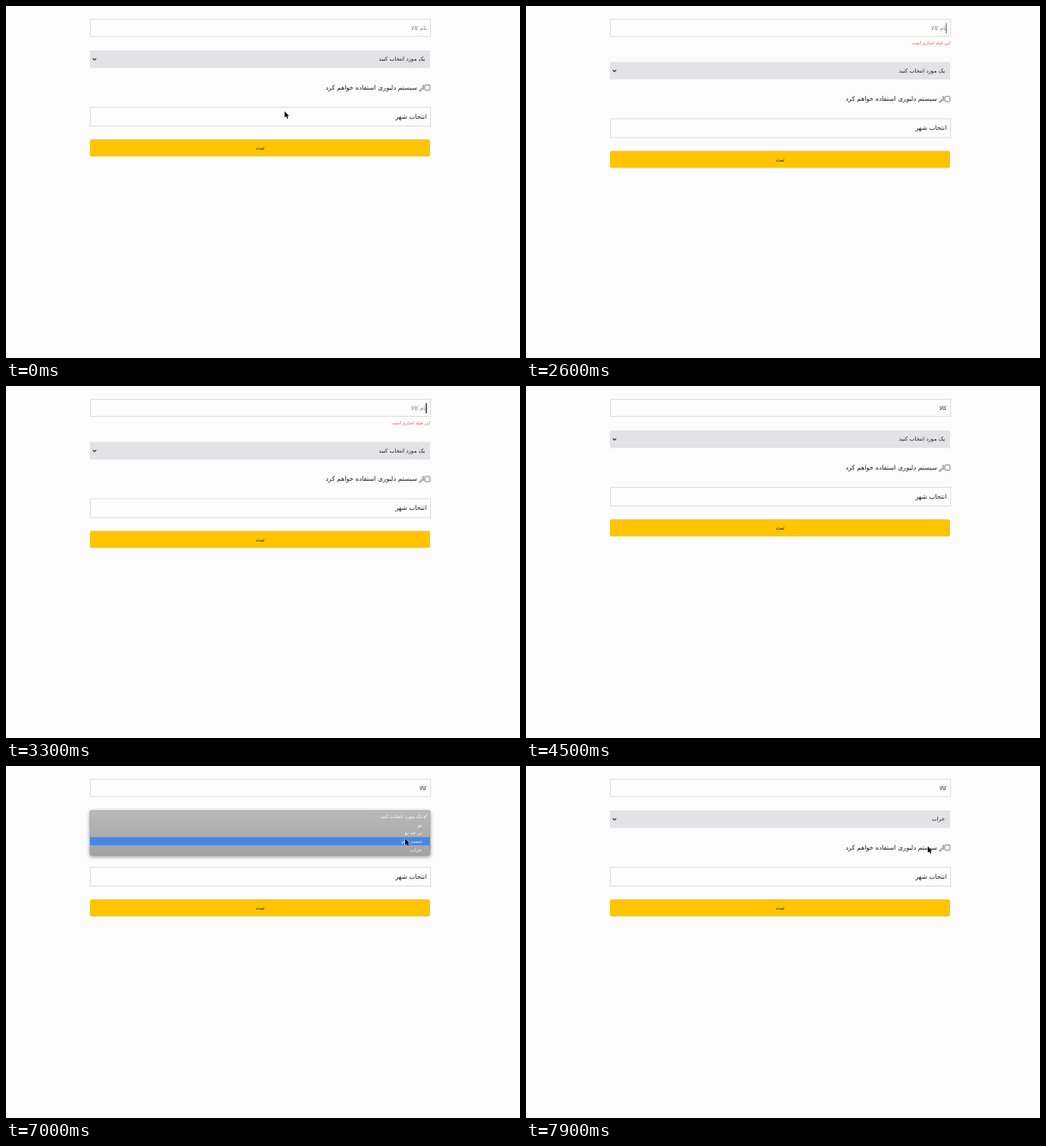
An HTML page for the animation above (8000 ms loop, 600 by 412 pixels).

```html
<!DOCTYPE html>
<html lang="fa">
<head>
<meta charset="utf-8">
<title>Form</title>
<style>
  html, body { margin: 0; width: 100%; height: 100%; overflow: hidden; background: #fcfcfc; }
  svg { display: block; width: 100vw; height: 100vh; }
  text { font-family: "DejaVu Sans", "Noto Sans", sans-serif; direction: rtl; text-rendering: geometricPrecision; fill: #1c1c1c; }
  .small { font-size: 6.35px; }
  .body { font-size: 7.45px; }
  .error { font-size: 5.1px; fill: #f2545b; }
  .field { fill: #fdfdfd; stroke: #dedede; }
  .menu text { font-size: 5.7px; fill: #fff; }
</style>
</head>
<body>
<svg viewBox="0 0 600 412" preserveAspectRatio="none">
  <defs>
    <linearGradient id="gray" x1="0" y1="0" x2="0" y2="1">
      <stop offset="0" stop-color="#b9b9ba"/>
      <stop offset="1" stop-color="#a2a2a3"/>
    </linearGradient>
    <filter id="shadow" x="-5%" y="-30%" width="110%" height="170%">
      <feDropShadow dx="0" dy="1.6" stdDeviation="1.9" flood-color="#000" flood-opacity=".42"/>
    </filter>
  </defs>
  <rect width="600" height="412" fill="#fcfcfc"/>

  <rect class="field" x="98.5" y="15.5" width="397" height="20"/>
  <text id="value" class="small" x="491" y="28"></text>
  <rect id="caret" y="20" width="1" height="12" fill="#111"/>
  <text id="error" class="error" x="495" y="45.2">این فیلد اجباری است</text>

  <g id="rest">
    <rect x="98" y="52" width="397" height="20.5" fill="#e3e3e7"/>
    <path d="M101.3 61.3l2 2 2-2" fill="none" stroke="#222" stroke-width="1.1"/>
    <text id="choice" class="small" x="489" y="64.2"></text>
    <rect x="488.9" y="92.4" width="6" height="6" rx=".8" fill="#fff" stroke="#666" stroke-width=".8"/>
    <text class="body" x="488" y="97.6">از سیستم دلیوری استفاده خواهم کرد</text>
    <rect class="field" x="98.5" y="118.5" width="397" height="22"/>
    <text class="body" x="491" y="131.8">انتخاب شهر</text>
    <rect x="98" y="156" width="397" height="20" rx="2" fill="#ffc400"/>
    <text class="small" x="296.8" y="168" text-anchor="middle" style="fill:#2b2400">ثبت</text>
  </g>

  <g id="menu" class="menu">
    <rect x="98" y="52" width="397" height="52.6" rx="1.6" fill="url(#gray)" stroke="#8d8d8d" stroke-width=".5" filter="url(#shadow)"/>
    <rect id="highlight" x="98" width="397" height="9.5" fill="#4688e6"/>
    <path d="M487.6 59.2l1.2 1.7 2.3-4.1" fill="none" stroke="#fff" stroke-width=".9"/>
  </g>

  <path id="arrow" d="M0 0V7.4L1.7 5.9 2.8 8.6 4.1 8 3 5.5H5.2Z" fill="#000" stroke="#fff" stroke-width=".7" paint-order="stroke"/>
  <path id="beam" d="M-1.6-4.6Q0-4.6 0-3.4Q0-4.6 1.6-4.6M0-3.4V3.4M-1.6 4.6Q0 4.6 0 3.4Q0 4.6 1.6 4.6" fill="none" stroke="#333" stroke-width=".8"/>
</svg>
<script>
const LOOP = 8000, STEP = 100;
const MENU_TOP = 54.4, ROW = 9.65;
const OPTIONS = ["یک مورد انتخاب کنید", "نو", "در حد نو", "دست دوم", "خراب"];
const $ = id => document.getElementById(id);

// time, x, y of the pointer
const PATH = [
  [200, 325.3, 123.2], [900, 309, 165.5], [1500, 309, 165.5], [1900, 477, 18],
  [5500, 477, 17], [6300, 467.3, 72.3], [6700, 467.3, 72.3], [7000, 466, 85],
  [7100, 466, 85], [7300, 464.6, 94], [7500, 464.6, 94], [7900, 469, 94]
];
// time, typed text
const TYPING = [[0, ""], [2700, "ک"], [3300, ""], [3600, "کا"], [3900, "کالا"]];
// time, opacity of the text caret
const CARET = [[0, 0], [1100, 1], [1600, .5], [1700, 0], [2200, 1], [2600, .6],
  [2700, 1], [4300, .4], [4500, 0], [5100, 1], [5600, 0]];
const CARET_X = { "": 490, "ک": 484.5, "کا": 485.5, "کالا": 481 };
const FADE = [[0, 0], [6700, 1], [7600, .55], [7700, .15], [7800, 0]];

OPTIONS.forEach((label, i) => {
  const text = document.createElementNS("http://www.w3.org/2000/svg", "text");
  text.setAttribute("x", 485.5);
  text.setAttribute("y", MENU_TOP + ROW * i + 6.6);
  text.textContent = label;
  $("menu").append(text);
});

const latest = (track, t) => track.filter(key => key[0] <= t).pop()[1];
const show = (id, opacity) => $(id).setAttribute("opacity", Number(opacity));
const move = (id, x, y) => $(id).setAttribute("transform", `translate(${x} ${y})`);
const setText = (id, text) => { if ($(id).textContent !== text) $(id).textContent = text; };

function pointerAt(t) {
  const next = PATH.findIndex(key => key[0] > t);
  if (next === 0) return PATH[0].slice(1);
  if (next < 0) return PATH[PATH.length - 1].slice(1);
  const [t0, x0, y0] = PATH[next - 1], [t1, x1, y1] = PATH[next];
  const u = (t - t0) / (t1 - t0), k = u * u * (3 - 2 * u);
  return [x0 + (x1 - x0) * k, y0 + (y1 - y0) * k];
}

function render(time) {
  const t = Math.floor(time % LOOP / STEP) * STEP;

  const typed = latest(TYPING, t);
  setText("value", typed || "نام کالا");
  $("value").style.fill = typed ? "#1c1c1c" : "#777";
  $("caret").setAttribute("x", CARET_X[typed]);
  show("caret", latest(CARET, t));

  const invalid = t >= 1100 && !typed;
  show("error", invalid);
  move("rest", 0, invalid ? 13.5 : 0);
  setText("choice", OPTIONS[t < 7500 ? 0 : 4]);

  const [x, y] = pointerAt(t);
  const hidden = t >= 2600 && t < 5600;
  const overInput = y > 15 && y < 36;
  show("arrow", !hidden && !overInput);
  show("beam", !hidden && overInput);
  move("arrow", x, y);
  move("beam", x, y);

  const row = Math.max(0, Math.min(4, Math.floor((y - MENU_TOP) / ROW)));
  $("highlight").setAttribute("y", MENU_TOP + ROW * row);
  show("highlight", t !== 7400);
  show("menu", latest(FADE, t));
}

const start = performance.now();
function tick() {
  render(performance.now() - start);
  requestAnimationFrame(tick);
}
tick();
</script>
</body>
</html>
```
